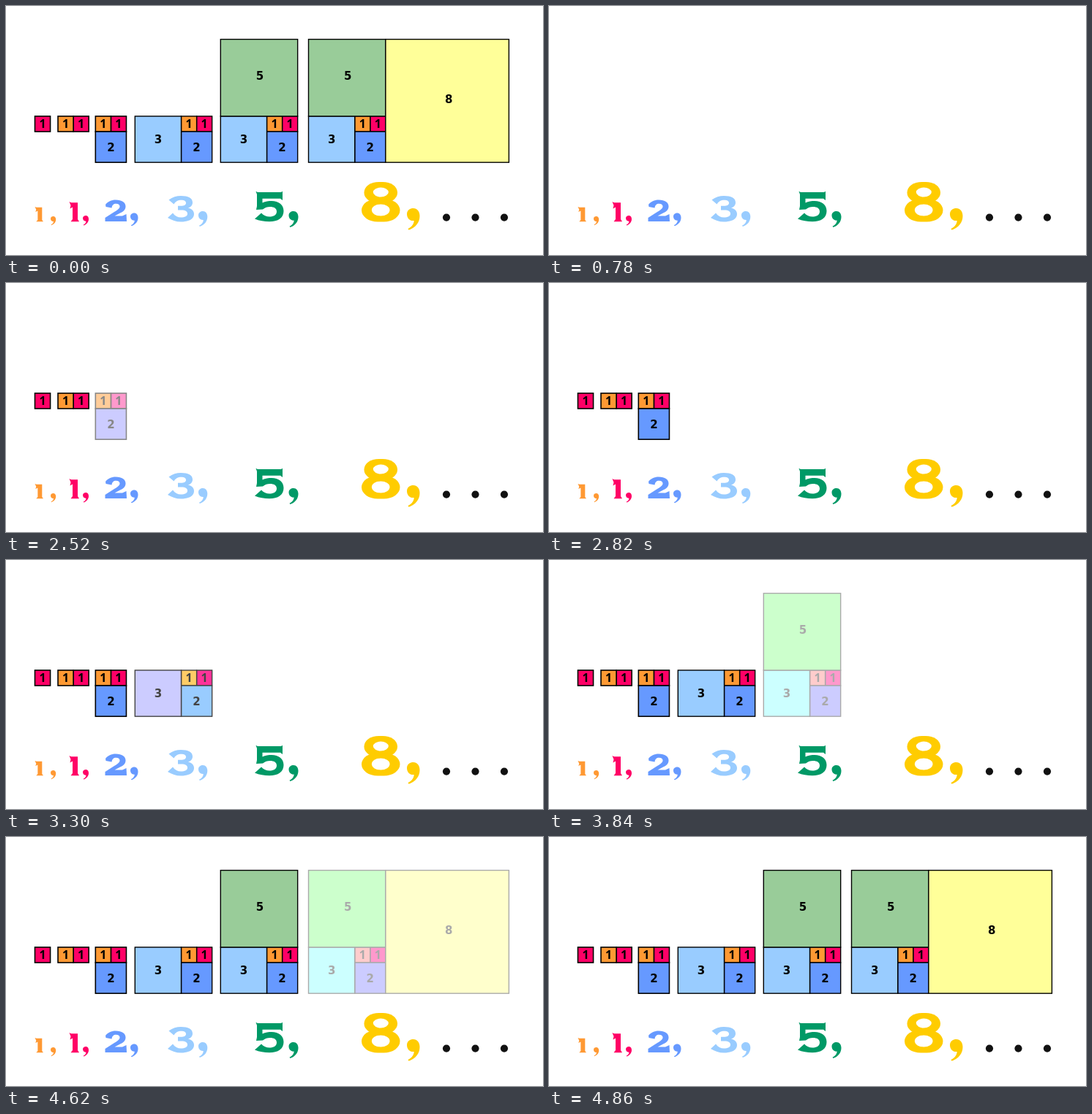
An HTML page that plays this animation: 734 by 341 pixels, repeating every 5.34 s.

```html
<!DOCTYPE html>
<html lang="en">
<head>
<meta charset="utf-8">
<title>Fibonacci squares</title>
<style>
  html, body { margin: 0; width: 100%; height: 100%; overflow: hidden; background: #fff; }
  svg { display: block; width: 734px; height: 341px; }
  text { font: bold 15px "DejaVu Sans", sans-serif; text-anchor: middle; }
  .one { font: bold 16px "Open Sans", sans-serif; }
</style>
</head>
<body>
<svg viewBox="0 0 734 341" xmlns="http://www.w3.org/2000/svg">
  <defs>
    <path id="one" d="M86.5 268L89 269.3H98V292L100 295.2H88.5L91 292V275.5L87.5 277.5L88.5 273Z"/>
    <path id="comma" d="M0 .45C0 .15 .25 0 .5 0C.8 0 1 .25 1 .6C1 1.1 .7 1.5 .15 1.7L.08 1.6C.4 1.45 .55 1.2 .55 .97C.2 1 0 .75 0 .45Z"/>
  </defs>
  <g id="squares"></g>
  <g role="img" aria-label="1, 1, 2, 3, 5, 8, . . .">
    <g fill="#ff9933">
      <use href="#one" transform="translate(-34 73.9) scale(.85 .75)"/>
      <use href="#comma" transform="translate(61 288) scale(7.2)"/>
    </g>
    <g fill="#ff0066">
      <use href="#one"/>
      <use href="#comma" transform="translate(105 287) scale(8)"/>
    </g>
    <g fill="#6699ff">
      <path d="M136 272C139 268 144 265.5 150 265.5C158.5 265.5 163.5 269 163.5 274.5C163.5 279 160.5 281.5 156 283.5L148.5 287.5H159L164.5 285L165 295H135.5V290L148 282C153 279 155.5 277 155.5 274.5C155.5 272 153.5 270.7 150.5 270.7C147 270.7 145 272.5 144.5 276.5L136.5 275Z"/>
      <use href="#comma" transform="translate(170 283.5) scale(10.5)"/>
    </g>
    <g fill="#99ccff">
      <path d="M222.5 265.5C228 261.5 233 260 239 260C249 260 255 263 255 269C255 273 252.5 275.5 249 276.5C254 277.8 257 280.5 257 285C257 291.5 250 295.5 239 295.5C232 295.5 227 293.5 221 290L228 283.5C231 287.5 234.5 289.5 239 289.5C244.5 289.5 248 288 248 284.5C248 281 245 279.5 240 279.5H235V273.8H239C243.5 273.8 246 272.5 246 269.7C246 267 243.5 265.8 239.5 265.8C235 265.8 232 267.5 229.5 271.5Z"/>
      <use href="#comma" transform="translate(263 281) scale(12.3)"/>
    </g>
    <g fill="#009966">
      <path d="M341.5 253.7L344 255H376L378 253.7V266L375 263.7H350.5V269.5C354.5 267.6 359 267 363 267C373 267 379.5 272.5 379.5 280.7C379.5 290 372 295.3 360 295.3C353 295.3 346 294 340 291.5L349 283.5C352 287 356 288.5 360 288.5C366 288.5 370 286 370 281.5C370 277 366 275 361 275C357 275 354 276 351 278.5L342 279L343 274V258Z"/>
      <use href="#comma" transform="translate(386.5 281) scale(13)"/>
    </g>
    <g fill="#ffcc00">
      <rect x="489.5" y="241" width="45.5" height="29" rx="20" ry="14"/>
      <rect x="486" y="264" width="52.5" height="31.5" rx="22" ry="15.7"/>
      <ellipse cx="512.3" cy="255" rx="10.5" ry="6.5" fill="#fff"/>
      <ellipse cx="512.2" cy="279.5" rx="12.3" ry="8" fill="#fff"/>
      <use href="#comma" transform="translate(548 277) scale(17.5)"/>
    </g>
    <g fill="#111">
      <circle cx="602" cy="289.6" r="5.1"/>
      <circle cx="641.5" cy="289.6" r="5.1"/>
      <circle cx="681" cy="289.6" r="5.1"/>
    </g>
  </g>
</svg>
<script>
const LOOP = 5340, STEP = 60, CLEAR = 780;
const UNIT = 21.07, TOP = 45.6;

// Squares in units, in the order they join the spiral; dx, dy nudge the label.
const squares = [
  { n: 1, x: 4, y: 5, rgb: [255, 0, 102] },
  { n: 1, x: 3, y: 5, rgb: [255, 153, 51] },
  { n: 2, x: 3, y: 6, rgb: [102, 153, 255] },
  { n: 3, x: 0, y: 5, rgb: [153, 204, 255] },
  { n: 5, x: 0, y: 0, rgb: [153, 204, 153], dx: 1, dy: -3 },
  { n: 8, x: 5, y: 0, rgb: [255, 255, 153], dx: 2, dy: -2 }
];

// Left origin, fade start and end, and easing power of each figure.
const figures = [
  { left: -44.8, from: 1440, to: 1620, pow: 1 },
  { left: 7.8, from: 1800, to: 2160, pow: 2 },
  { left: 59.1, from: 2340, to: 2820, pow: 1 },
  { left: 176.3, from: 3060, to: 3480, pow: 0.7 },
  { left: 293.3, from: 3720, to: 4380, pow: 0.8 },
  { left: 413.5, from: 4560, to: 4860, pow: 1 }
];

function add(parent, tag, attrs) {
  const el = document.createElementNS("http://www.w3.org/2000/svg", tag);
  for (const key in attrs) el.setAttribute(key, attrs[key]);
  return parent.appendChild(el);
}

// Fade from white through a coarse palette: a colour cube plus a grey ramp.
function fade(rgb, alpha) {
  const mix = rgb.map(c => 255 + (c - 255) * alpha);
  let out = mix.map(c => Math.round(c / 51) * 51);
  if (out[0] === out[1] && out[1] === out[2]) {
    const mean = (mix[0] + mix[1] + mix[2]) / 3;
    out = Array(3).fill(Math.floor(mean / 17 + 1e-6) * 17);
  }
  return `rgb(${out})`;
}

const stage = document.getElementById("squares");
figures.forEach((fig, i) => {
  fig.group = add(stage, "g", { "stroke-width": i < 3 ? 1.6 : 1.4 });
  fig.parts = squares.slice(0, i + 1).map(({ n, x, y, rgb, dx = 0, dy = 0 }) => {
    const size = n * UNIT, px = fig.left + x * UNIT, py = TOP + y * UNIT;
    const box = add(fig.group, "rect", { x: px, y: py, width: size, height: size });
    const label = add(fig.group, "text", {
      x: px + size / 2 + dx, y: py + size / 2 + 5.5 + dy,
      class: n === 1 ? "one" : "", stroke: "none"
    });
    label.textContent = n;
    return { box, label, rgb };
  });
});

function alphaAt(fig, t) {
  if (t < CLEAR || t >= fig.to) return 1;
  if (t < fig.from) return 0;
  return ((t - fig.from + STEP) / (fig.to - fig.from + STEP)) ** fig.pow;
}

function draw(time) {
  const t = Math.floor((time % LOOP) / STEP) * STEP;
  for (const fig of figures) {
    const alpha = alphaAt(fig, t);
    if (alpha === fig.alpha) continue;
    fig.alpha = alpha;
    const ink = fade([0, 0, 0], alpha);
    fig.group.setAttribute("visibility", alpha ? "visible" : "hidden");
    fig.group.setAttribute("stroke", ink);
    for (const { box, label, rgb } of fig.parts) {
      box.setAttribute("fill", fade(rgb, alpha));
      label.setAttribute("fill", ink);
    }
  }
}

const start = performance.now();
function tick() {
  draw(performance.now() - start);
  requestAnimationFrame(tick);
}
tick();
</script>
</body>
</html>
```
